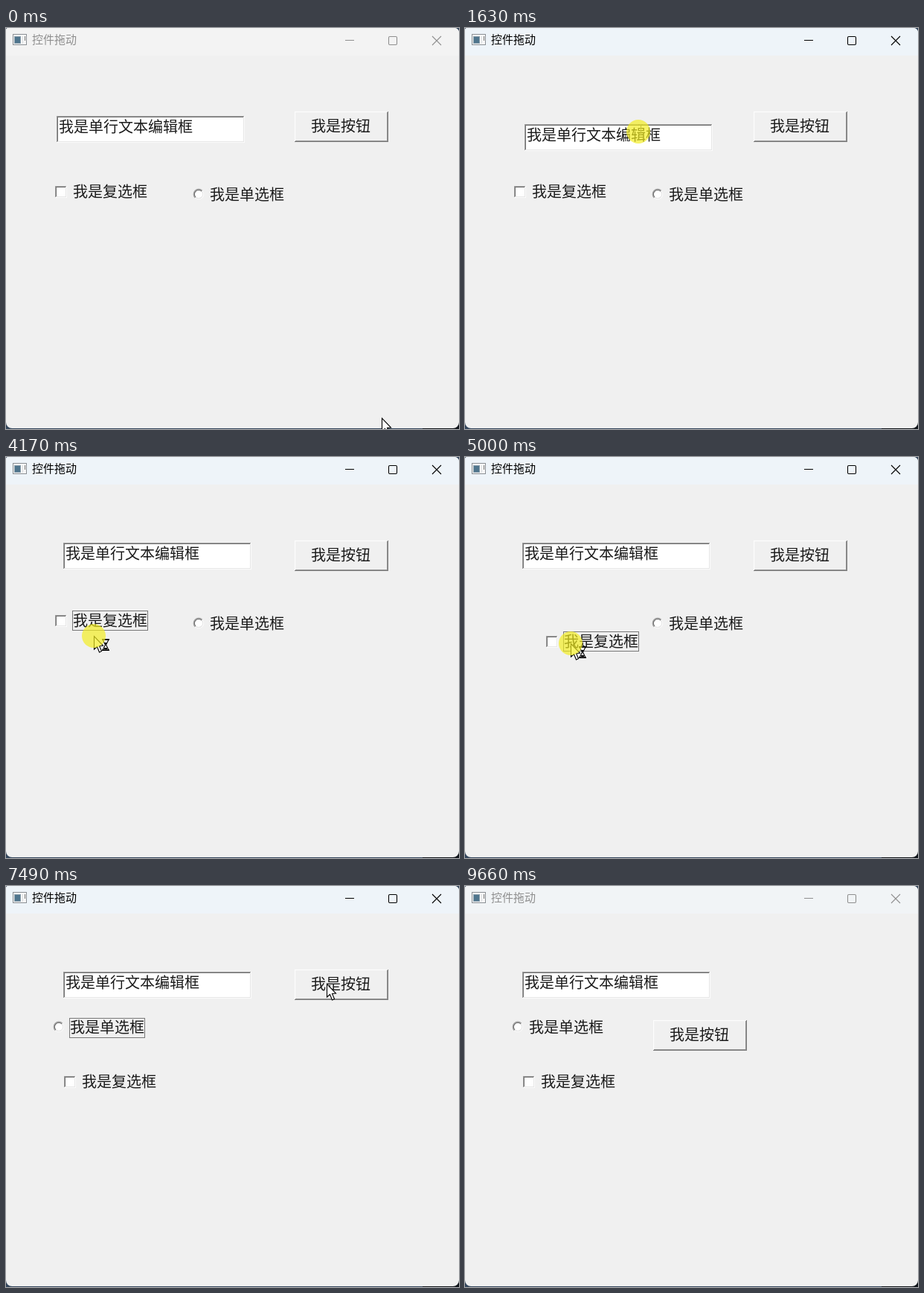
Animation, 609 px wide and 538 px high, one loop 9.73 s. Source, as an HTML page with a canvas:

```html
<!DOCTYPE html>
<html lang="zh">
<head>
<meta charset="utf-8">
<title>控件拖动</title>
<style>
html, body { margin: 0; width: 100%; height: 100%; overflow: hidden; background: #34465c; }
canvas { display: block; }
</style>
</head>
<body>
<canvas id="stage" width="609" height="538"></canvas>
<script>
const g = document.getElementById('stage').getContext('2d');
const LOOP = 9730, STEP = 67.1;
const FONT = '"Noto Sans CJK SC", "Noto Sans CJK", sans-serif';
const HOME = [505, 523];

// Pointer moves; bend is how far the path bulges at its middle
const moves = [
  { from: 70, to: 810, at: [221, 128] },
  { from: 1100, to: 1950, at: [230, 125], bend: [7, 15] },
  { from: 1980, to: 2250, at: [206, 204] },
  { from: 2320, to: 3130, at: [114, 224] },
  { from: 3350, to: 4170, at: [118, 240], bend: [17, 49] },
  { from: 4370, to: 4950, at: [142, 250] },
  { from: 5010, to: 5280, at: [111, 265] },
  { from: 5350, to: 6080, at: [306, 222] },
  { from: 6380, to: 6850, at: [118, 188] },
  { from: 6950, to: 7430, at: [431, 131] },
  { from: 7540, to: 8150, at: [296, 199] },
  { from: 8510, to: 8770, at: [474, 491] }
];

// Times during which each control follows the pointer
const drags = {
  edit: [1010, 1980], check: [4365, 5345], radio: [6240, 6910], button: [7530, 8170]
};
const CHECK_PRESS = 3130, CHECK_FOCUS = 3200, RADIO_FOCUS = 6370, BUTTON_FOCUS = 8500;

const within = (t, [a, b]) => t >= a && t < b;

function pointer(t) {
  let p = HOME;
  for (const { from, to, at, bend = [0, 0] } of moves) {
    if (t < from) break;
    const u = Math.min(1, (t - from) / (to - from)), e = u * u * (3 - 2 * u);
    p = p.map((v, i) => Math.round(v + (at[i] - v) * e + bend[i] * Math.sin(Math.PI * e)));
  }
  return p;
}

// Offset of a dragged control; jump is its leap when the drag begins
function dragged(t, [from, to], jump = [0, 0]) {
  if (t < from) return [0, 0];
  const grab = pointer(from);
  return pointer(Math.min(t, to)).map((v, i) => v - grab[i] + jump[i]);
}

function rect(x, y, w, h, color) {
  g.fillStyle = color;
  g.fillRect(x, y, w, h);
}

function text(s, x, middle, size = 20, color = '#1a1a1a') {
  g.font = size + 'px ' + FONT;
  g.fillStyle = color;
  g.fillText(s, x, middle + size * 0.38);
}

function stroke(color, width, ...lines) {
  g.strokeStyle = color;
  g.lineWidth = width;
  g.beginPath();
  for (const [x, y, ...rest] of lines) {
    g.moveTo(x, y);
    for (let i = 0; i < rest.length; i += 2) g.lineTo(rest[i], rest[i + 1]);
  }
  g.stroke();
}

function shape(x, y, points, width) {
  g.beginPath();
  points.forEach(([px, py]) => g.lineTo(x + px, y + py));
  g.closePath();
  g.fillStyle = '#fff';
  g.fill();
  g.strokeStyle = '#000';
  g.lineWidth = width;
  g.stroke();
}

// Nested rectangles give the two-pixel classic edge
function bevel(x, y, w, h, [outerTop, innerTop, innerBottom, outerBottom], face) {
  rect(x, y, w, h, outerBottom);
  rect(x, y, w - 1, h - 1, outerTop);
  rect(x + 1, y + 1, w - 2, h - 2, innerBottom);
  rect(x + 1, y + 1, w - 3, h - 3, innerTop);
  rect(x + 2, y + 2, w - 4, h - 4, face);
}
const SUNKEN = ['#9a9a9a', '#737373', '#e6e6e6', '#fbfbfb'];
const RAISED = ['#fdfdfd', '#f2f2f2', '#8f8f8f', '#808080'];

function focusRect(x, y) {
  g.setLineDash([1, 1]);
  g.strokeStyle = '#000';
  g.lineWidth = 1;
  g.strokeRect(x + 0.5, y + 0.5, 101, 26);
  g.setLineDash([]);
}

function titleBar(t) {
  const active = within(t, [1010, 9590]);
  const mix = active ? Math.min(1, (t - 940) / 200) : t >= 9590 ? 0.5 : 0;
  rect(0, 0, 609, 37, `rgb(${243 - 5 * mix},${243 + mix},${243 + 6 * mix})`);
  const ink = active ? '#000' : '#8f8f8f';
  rect(9, 8, 19, 15, '#8a8f94');
  rect(10, 9, 17, 13, '#f7f7f7');
  rect(11, 11, 9, 10, '#8ba0ad');
  rect(12, 12, 7, 8, '#4f758d');
  rect(22, 11, 1, 10, '#d5d9dc');
  rect(25, 11, 1, 6, '#777');
  text('控件拖动', 35, 15.5, 15, ink);
  stroke(ink, 1.1, [456, 16.5, 468, 16.5], [573, 11, 585, 23], [585, 11, 573, 23]);
  g.beginPath();
  g.roundRect(514.5, 11.5, 11, 11, 1.5);
  g.stroke();
}

function editBox(t) {
  const [dx, dy] = dragged(t, drags.edit);
  const x = 68 + dx, y = 118 + dy;
  bevel(x, y, 253, 36, SUNKEN, '#fff');
  text('我是单行文本编辑框', x + 3, y + 14);
  if (within(t, [drags.edit[1], CHECK_FOCUS])) {
    rect(x + 63, y + 3, 20, 23, '#0078d7');
    text('行', x + 63, y + 14, 20, '#fff');
  }
}

function checkBox(t) {
  const [dx, dy] = dragged(t, drags.check, [19, 18]);
  bevel(66 + dx, 212 + dy, 16, 16, SUNKEN, '#fff');
  text('我是复选框', 90 + dx, 219.3 + dy);
  if (within(t, [CHECK_FOCUS, RADIO_FOCUS])) focusRect(89 + dx, 206 + dy);
}

function radio(t) {
  const [dx, dy] = dragged(t, drags.radio);
  const x = 259 + dx, y = 223 + dy;
  const arc = (r, from, to, color) => {
    g.beginPath();
    g.arc(x, y, r, from, to);
    g.strokeStyle = color;
    g.lineWidth = 1.2;
    g.stroke();
  };
  g.beginPath();
  g.arc(x, y, 7, 0, 7);
  g.fillStyle = '#fff';
  g.fill();
  const a = Math.PI * 0.75, b = Math.PI * 1.75;
  arc(6.8, a, b, '#a0a0a0');
  arc(5.7, a, b, '#737373');
  arc(5.7, b, a, '#e6e6e6');
  text('我是单选框', x + 15, y + 0.5);
  if (within(t, [RADIO_FOCUS, BUTTON_FOCUS])) focusRect(x + 14, y - 12);
}

function button(t) {
  const [dx, dy] = dragged(t, drags.button);
  bevel(388 + dx, 112 + dy, 126, 41, RAISED, '#f0f0f0');
  text('我是按钮', 410 + dx, 131 + dy);
}

function arrow(x, y) {
  shape(x + 0.5, y + 0.5,
    [[0, 0], [0, 17.5], [4, 14], [7, 21.5], [10, 20], [7, 13], [12, 12.5]], 1.1);
}

function hourglass(x, y) {
  shape(x, y, [[1, 1], [9, 1], [5.5, 8], [9, 15], [1, 15], [4.5, 8]], 1.1);
  rect(x, y, 10, 1.5, '#000');
  rect(x, y + 14.5, 10, 1.5, '#000');
  rect(x + 4, y + 5, 2, 2, '#000');
  rect(x + 3, y + 12, 4, 2, '#000');
}

function beam(x, y) {
  stroke('#777', 1,
    [x - 3, y - 6.5, x, y - 5.5, x + 3, y - 6.5],
    [x + 0.5, y - 5, x + 0.5, y + 5],
    [x - 3, y + 6.5, x, y + 5.5, x + 3, y + 6.5]);
}

function drawPointer(t) {
  if (t >= 8780) return;
  const [x, y] = pointer(t);
  const { edit, check, radio, button } = drags;
  if (within(t, [740, edit[1]])) beam(x + 3, y - 3);
  else arrow(x, y);
  if (within(t, [3350, check[1]]) || within(t, [RADIO_FOCUS, radio[1]])) hourglass(x + 11, y + 4);
  if ([edit, [CHECK_PRESS, check[1]], radio, button].some(span => within(t, span))) {
    g.beginPath();
    g.arc(x, y, 16, 0, 7);
    g.fillStyle = 'rgba(243,238,30,0.68)';
    g.fill();
  }
}

function draw(now) {
  const t = Math.floor((now % LOOP) / STEP) * STEP;
  rect(0, 0, 609, 538, '#34465c');
  rect(560, 500, 49, 38, '#10141a');
  g.save();
  g.beginPath();
  g.roundRect(0, 0, 609, 537, [3, 6, 8, 8]);
  g.clip();
  rect(0, 0, 609, 537, '#f0f0f0');
  titleBar(t);
  editBox(t);
  checkBox(t);
  radio(t);
  button(t);
  g.restore();
  drawPointer(t);
}

let start;
function tick(now) {
  start ??= now;
  draw(now - start);
  requestAnimationFrame(tick);
}
requestAnimationFrame(tick);
</script>
</body>
</html>
```
